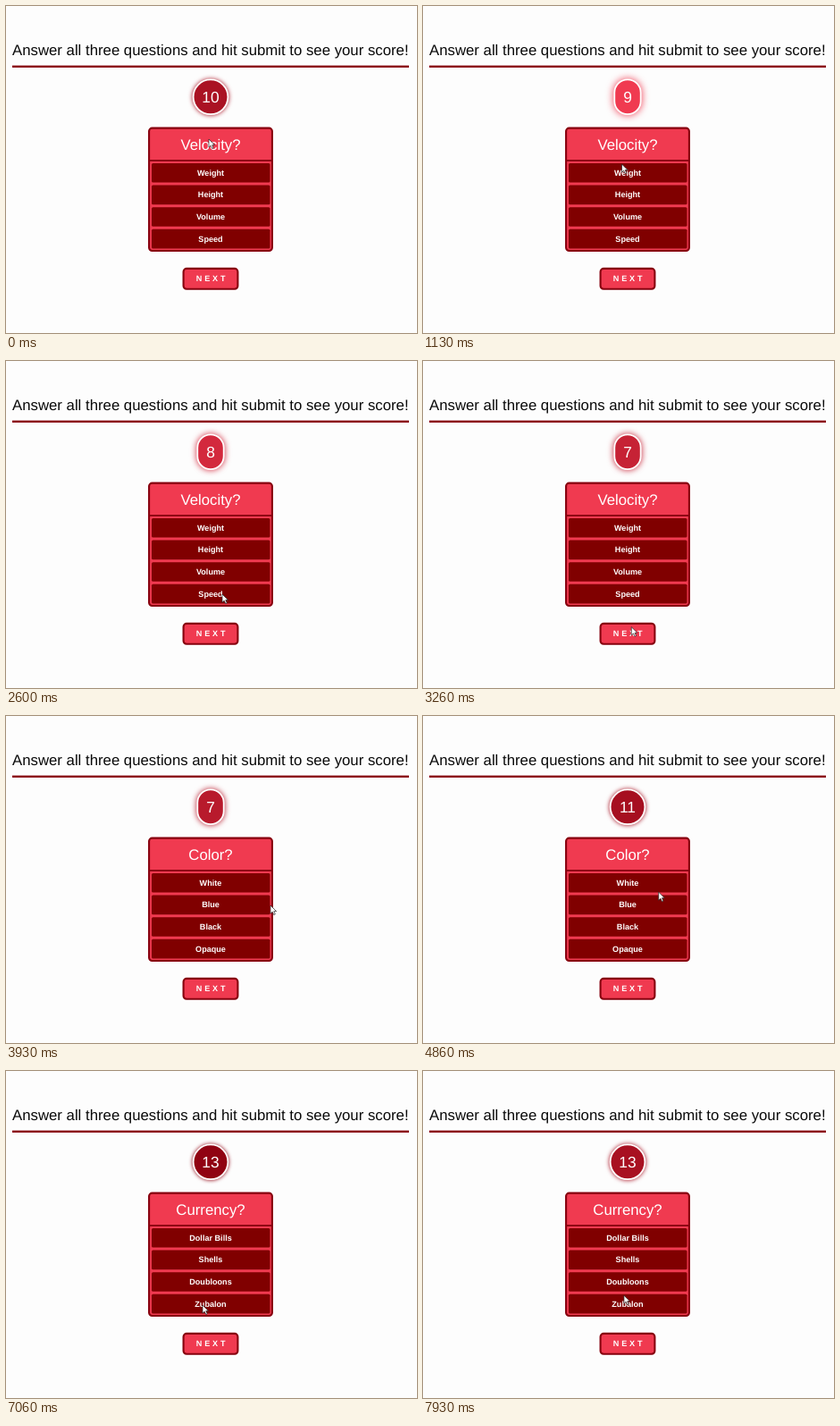
Write an HTML page that moves like this. It is 460 px wide and 366 px high and loops after 8 s.

```html
<!DOCTYPE html>
<html lang="en">
<head>
<meta charset="utf-8">
<title>Quiz</title>
<style>
  html, body { margin: 0; width: 100%; height: 100%; overflow: hidden; background: #fdfdfd; }
  svg { display: block; width: 460px; height: 366px; }
  text { font: 16.78px "Liberation Sans", Arial, sans-serif; text-rendering: geometricPrecision; fill: #fff; }
  .mid { text-anchor: middle; }
  .option, .next { font-size: 9.1px; font-weight: bold; }
  .next { letter-spacing: 2.9px; }
  .box { fill: #f03a50; stroke: #87000e; stroke-width: 2.1; }
  #count { font-size: 17.4px; }
</style>
</head>
<body>
<svg viewBox="0 0 460 366">
  <text x="7" y="54.9" style="fill:#0a0a0a">Answer all three questions and hit submit to see your score!</text>
  <rect x="7" y="66.6" width="444" height="2.3" fill="#87000e"/>

  <rect id="glow"/>
  <rect id="badge" stroke="#fff" stroke-width="1.8"/>
  <text id="count" class="mid" x="229" y="107.6"/>

  <rect class="box" x="160.1" y="136.6" width="137.8" height="137.4" rx="3.5"/>
  <rect x="161" y="172.1" width="136" height="1.8" fill="#87000e"/>
  <text id="question" class="mid" x="229" y="161"/>
  <g id="options"></g>

  <rect class="box" x="198.6" y="293.9" width="60.8" height="22.8" rx="3.5"/>
  <text class="next" x="212.7" y="308.3">NEXT</text>

  <path id="cursor" d="M0 0V9.2L2.2 7.2L3.8 10.6L5.3 9.9L3.8 6.6H6.6Z" fill="#fff" stroke="#222" stroke-width=".7"/>
</svg>
<script>
const LOOP = 8;
const NEXT_CLICKS = [3.45, 6.45];
const BRIGHTEST = 1.13, DARKEST = 6.2;
const byId = id => document.getElementById(id);

const quiz = [
  { title: "Velocity?", answers: ["Weight", "Height", "Volume", "Speed"] },
  { title: "Color?", answers: ["White", "Blue", "Black", "Opaque"] },
  { title: "Currency?", answers: ["Dollar Bills", "Shells", "Doubloons", "Zubalon"] }
];

// The pointer eases from stop to stop, pressing NEXT after each answer.
const stops = [
  { at: 0, x: 227, y: 149 },
  { at: 1.13, x: 222.5, y: 177 },
  { at: 2.6, x: 242, y: 261 },
  { at: NEXT_CLICKS[0], x: 232, y: 303 },
  { at: 3.93, x: 296, y: 212 },
  { at: 5.8, x: 231, y: 182 },
  { at: NEXT_CLICKS[1], x: 232, y: 303 },
  { at: 7.06, x: 220, y: 262 },
  { at: LOOP, x: 225, y: 251 }
];

const mix = (a, b, k) => a + (b - a) * k;
const clicksBefore = t => NEXT_CLICKS.filter(click => click <= t).length;

function cursorAt(t) {
  const i = stops.findIndex(stop => stop.at > t);
  const from = stops[i - 1], to = stops[i];
  const k = (t - from.at) / (to.at - from.at);
  const eased = k * k * (3 - 2 * k);
  return [mix(from.x, to.x, eased), mix(from.y, to.y, eased)];
}

// Fades evenly to dark, then brightens with an ease-in across the loop seam.
function brightness(t) {
  const age = (t - BRIGHTEST + LOOP) % LOOP;
  const fade = DARKEST - BRIGHTEST;
  return age < fade ? 1 - age / fade : ((age - fade) / (LOOP - fade)) ** 2.4;
}

function setAttributes(element, attributes) {
  for (const name in attributes) element.setAttribute(name, attributes[name]);
}

function placeBadge(element, width, height, attributes) {
  setAttributes(element, {
    x: 229 - width / 2, y: 101.8 - height / 2, width, height, rx: width / 2, ...attributes
  });
}

function drawBadge(t) {
  // Time won by answering shows up at the next one-second tick.
  const elapsed = Math.max(0, Math.floor(t - .03));
  const remaining = 10 - elapsed + 5 * clicksBefore(elapsed);
  const width = remaining > 9 ? 38.8 : 29.4;
  const level = brightness(t);
  const fill = `rgb(${mix(139, 240, level)},${mix(0, 58, level)},${mix(15, 80, level)})`;

  placeBadge(byId("badge"), width, 38.8, { fill });
  placeBadge(byId("glow"), width + 2, 40.8, { fill, style: `filter:blur(${mix(2.2, 4.5, level)}px)` });
  byId("count").textContent = remaining;
}

byId("options").innerHTML = quiz[0].answers.map((_, i) => {
  const y = 176 + i * 24.6;
  return `<rect x="163" y="${y}" width="132.5" height="21.6" rx="1.5" fill="#800000"/>
    <text class="option mid" x="229" y="${y + 13.7}"></text>`;
}).join("");
const labels = document.querySelectorAll(".option");

function draw(t) {
  const page = quiz[clicksBefore(t)];
  byId("question").textContent = page.title;
  labels.forEach((label, i) => label.textContent = page.answers[i]);
  drawBadge(t);
  byId("cursor").setAttribute("transform", `translate(${cursorAt(t)})`);
}

const start = performance.now();
function frame() {
  draw(Math.max(0, performance.now() - start) / 1000 % LOOP);
  requestAnimationFrame(frame);
}
frame();
</script>
</body>
</html>
```
